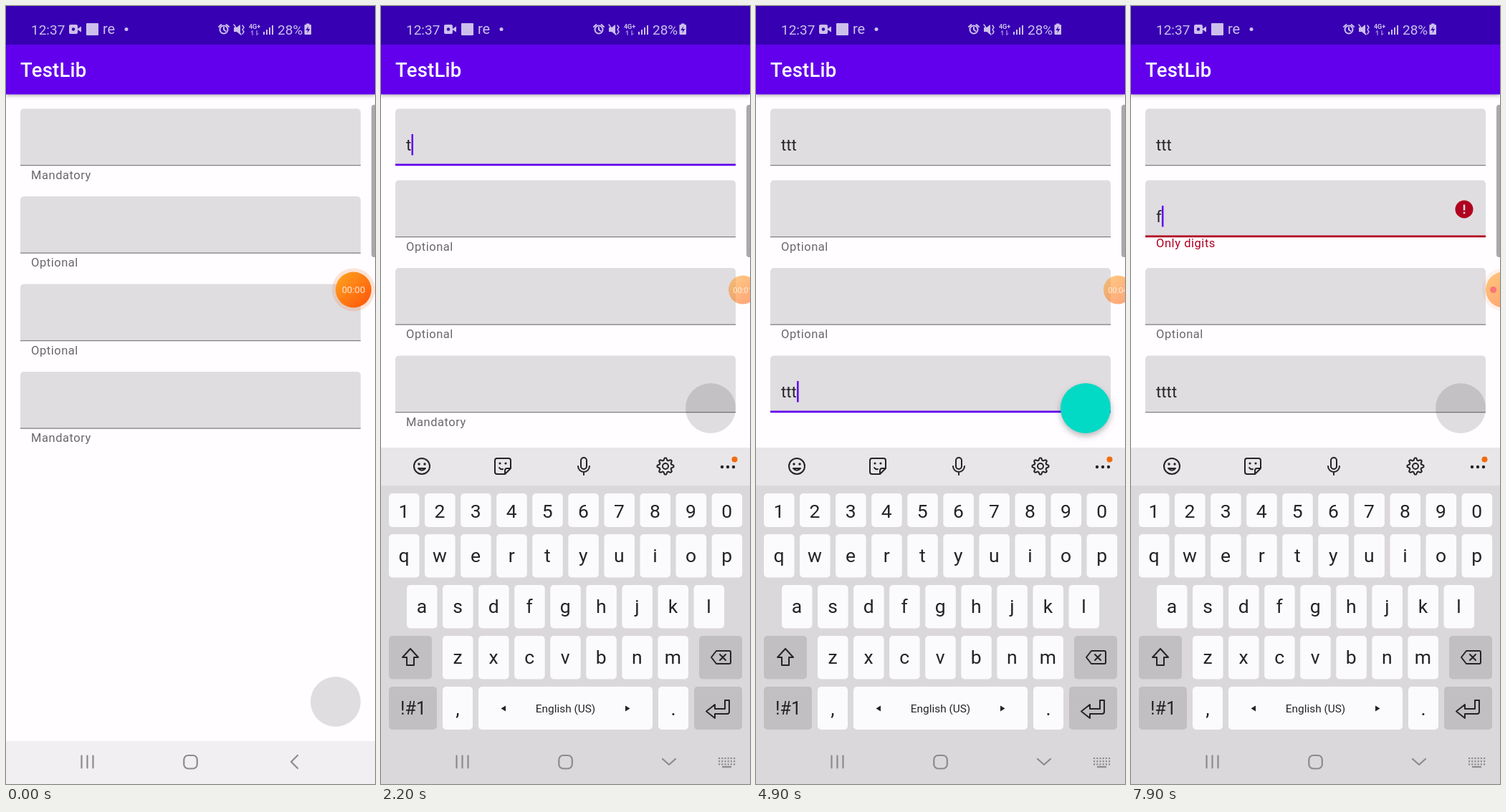
Write an HTML page with a canvas that moves like this. It is 515 by 1087 pixels and loops after 8 s.

```html
<!DOCTYPE html>
<html lang="en">
<head>
<meta charset="utf-8">
<title>Form validation</title>
<style>
html, body { margin: 0; width: 100%; height: 100%; overflow: hidden; background: #fffdff; }
canvas { display: block; }
</style>
</head>
<body>
<canvas id="stage" width="515" height="1087"></canvas>
<script>
const LOOP = 8000, STEP = 100;
const PURPLE = '#6200ee', RED = '#b00020', INK = '#242326', STATUS = '#cdbfec', NAV = '#8c8a8e';
const ctx = document.getElementById('stage').getContext('2d');

function box(x, y, w, h, r, color) {
  ctx.fillStyle = color;
  ctx.beginPath();
  ctx.roundRect(x, y, w, h, r);
  ctx.fill();
}

function disc(x, y, r, color) {
  ctx.fillStyle = color;
  ctx.beginPath();
  ctx.arc(x, y, r, 0, 7);
  ctx.fill();
}

function text(str, x, y, size, color, { align = 'left', weight = 400, spacing = 0 } = {}) {
  ctx.font = `${weight} ${size}px Roboto, sans-serif`;
  ctx.letterSpacing = spacing + 'px';
  ctx.textAlign = align;
  ctx.fillStyle = color;
  ctx.fillText(str, x, y);
}

function icon(d, x, y, color, width = 0) {
  const path = new Path2D(d);
  ctx.save();
  ctx.translate(x, y);
  ctx.lineCap = ctx.lineJoin = 'round';
  ctx.lineWidth = width;
  ctx.strokeStyle = ctx.fillStyle = color;
  width ? ctx.stroke(path) : ctx.fill(path);
  ctx.restore();
}

function withShadow(blur, dy, draw) {
  ctx.save();
  ctx.shadowColor = 'rgba(0,0,0,.28)';
  ctx.shadowBlur = blur;
  ctx.shadowOffsetY = dy;
  draw();
  ctx.restore();
}

const countPassed = (times, t) => times.filter(time => t >= time).length;
const ringPath = r => `M${r} 0A${r} ${r} 0 1 1 ${-r} 0A${r} ${r} 0 1 1 ${r} 0`;
const gearPath = 'M' + Array.from({ length: 64 }, (_, i) => {
  const a = i * Math.PI / 32, r = 10 + 1.5 * Math.tanh(3 * Math.cos(8 * a));
  return `${r * Math.cos(a)} ${r * Math.sin(a)}`;
}).join('L') + 'Z' + ringPath(4);

// Moments of each key press, release and caret toggle
const FIRST_TYPED = [2200, 2400, 2600], LAST_TYPED = [4500, 4700, 4900, 5100];
const CARET = [800, 1600, 2100, 3100, 3500, 4000, 4500, 5600, 6100, 7100, 7600];
const ERROR_AT = 7800;

function stateAt(t) {
  const first = 't'.repeat(countPassed(FIRST_TYPED, t));
  const last = 't'.repeat(countPassed(LAST_TYPED, t));
  const error = t >= ERROR_AT;
  const tPressed = [...FIRST_TYPED, ...LAST_TYPED].some(up => t >= up - 100 && t < up);
  return {
    values: [first, error ? 'f' : '', '', last],
    focus: t < 800 ? -1 : t < 3500 ? 0 : t < 6600 ? 3 : 1,
    caret: countPassed(CARET, t) % 2 === 1,
    pressed: tPressed ? 't' : t >= 7600 && t < ERROR_AT ? 'f' : '',
    keyboard: t >= 800,
    valid: first && last && !error,
    error
  };
}

function statusBar() {
  box(0, 0, 515, 54, 0, '#3700b3');
  text('12:37', 35, 40, 19, STATUS);
  box(88, 26, 12, 13, 2, STATUS);
  icon('M0 0L6 -4V4Z', 99, 32.5, STATUS);
  disc(94, 32.5, 2.2, '#3700b3');
  box(112, 24, 17, 17, 1, STATUS);
  text('re', 135, 38.5, 20, STATUS);
  disc(168, 32.5, 2.5, STATUS);

  icon(ringPath(5.5) + 'M0 -3V0L2.5 2M-7 -4L-3.5 -7M7 -4L3.5 -7', 304, 33, STATUS, 2);
  icon('M-7 -3H-3L2 -7V7L-3 3H-7Z', 325, 33, STATUS);
  icon('M-7 -7L3 7M5 -6L7 -3L5 0L7 3L5 6', 325, 33, STATUS, 1.5);
  text('4G+', 347, 32, 9, STATUS, { align: 'center', weight: 700 });
  icon('M-3 5V-1L-5 1M3 -1V5L5 3', 347, 35.5, STATUS, 1);
  for (let i = 0; i < 4; i++) box(359 + i * 4, 36 - i * 3, 2, 4 + i * 3, 0, STATUS);
  text('28%', 379, 40, 19, STATUS);
  box(416.5, 26, 9.5, 14, 1, STATUS);
  box(419, 24.5, 4.5, 3, 0, STATUS);
  icon('M1 -5L-3 1H0L-1 5L3 -1H0Z', 421.3, 33, '#3700b3');
}

function appBar() {
  withShadow(5, 2, () => box(0, 53.5, 515, 70, 0, PURPLE));
  text('TestLib', 20, 99, 27.5, '#fff', { weight: 500, spacing: .2 });
}

function form(t, state) {
  const helpers = ['Mandatory', 'Optional', 'Optional', 'Mandatory'];
  let top = 143.5;
  helpers.forEach((helper, i) => {
    const value = state.values[i], focused = state.focus === i, wrong = state.error && i === 1;
    box(20, top, 475, 79.5, [5, 5, 0, 0], '#dfdde0');
    if (focused) box(20, top + 77, 475, 2.7, 0, wrong ? RED : PURPLE);
    else box(20, top + 78.4, 475, 1.3, 0, '#807e82');

    text(value, 35, top + 58.5, 22, INK, { spacing: .1 });
    if (focused && state.caret) {
      const width = value ? ctx.measureText(value).width : 0;
      box(35.2 + width, top + 35.5, 2.5, 29.5, 0, PURPLE);
    }
    if (wrong) {
      const k = Math.min(1, (t - ERROR_AT + 100) / 200);
      ctx.globalAlpha = k;
      text('Only digits', 35, top + 93, 16.5, RED, { spacing: .55 });
      ctx.globalAlpha = 1;
      disc(465, top + 40.5, 12.5, RED);
      box(463.8, top + 34, 2.5, 8, 0, '#dfdde0');
      box(463.8, top + 44.2, 2.5, 2.5, 0, '#dfdde0');
    } else if (!value) {
      text(helper, 35, top + 98, 16.5, '#69676b', { spacing: .55 });
    }
    top += value && !wrong ? 100 : 122.5;
  });
}

function actionButton(state) {
  const y = state.keyboard ? 562 : 972;
  if (state.valid) withShadow(9, 4, () => disc(460, y, 35, '#03dac5'));
  else disc(460, y, 35, 'rgba(0,0,0,.125)');
}

function toolbar() {
  const y = 643;
  box(0, 617, 515, 53, 0, '#e8e6e9');
  icon(ringPath(11) + 'M-5 3Q0 8.5 5 3Z', 57, y, INK, 2);
  disc(53, y - 3, 1.7, INK);
  disc(61, y - 3, 1.7, INK);
  icon('M-8 -11H8Q11 -11 11 -8V3L3 11H-8Q-11 11 -11 8V-8Q-11 -11 -8 -11ZM11 3H6Q3 3 3 6V11M-5 2Q-3 5 0 4', 170, y, INK, 2);
  disc(166, y - 4, 1.6, INK);
  disc(174, y - 4, 1.6, INK);
  icon('M-4 -8A4 4 0 0 1 4 -8V0A4 4 0 0 1 -4 0ZM-8 0A8 8 0 0 0 8 0M0 8V12', 283, y, INK, 2);
  icon(gearPath, 397, y, INK, 2);
  for (const x of [476, 484, 492]) disc(x, y + 1, 2.2, INK);
  disc(493.5, 633.5, 4, '#f36b0c');
}

function keyboard(t, pressed) {
  const WHITE = '#fbfafc', GREY = '#c1bfc2';
  const rows = [
    ['1234567890', 32, 681, 47, 33.5], ['qwertyuiop', 32, 738, 60.5, 39],
    ['asdfghjkl', 57, 809, 60.5, 39], ['zxcvbnm', 107, 880, 60.5, 39]
  ];
  let popup;
  ctx.save();
  ctx.translate(0, 120 * Math.exp((800 - t) / 50));
  box(0, 617, 515, 470, 0, '#dad8db');
  toolbar();
  for (const [letters, x0, y, h, base] of rows) {
    [...letters].forEach((letter, i) => {
      const x = x0 + i * 50.07;
      if (letter === pressed) popup = { x, y };
      box(x - 21, y, 42.5, h, 5, letter === pressed ? '#afadb0' : WHITE);
      text(letter, x, y + base, 26.5, INK, { align: 'center' });
    });
  }
  box(11, 880, 60, 60.5, 5, GREY);
  box(444, 880, 60, 60.5, 5, GREY);
  icon('M0 -12L-11 0H-5V11H5V0H11Z', 41, 910, INK, 2);
  icon('M-13 0L-6 -9H12Q14 -9 14 -7V7Q14 9 12 9H-6ZM-1 -4L7 4M7 -4L-1 4', 474, 910, INK, 2);

  box(11, 951, 67, 60, 5, GREY);
  box(86, 951, 42, 60, 5, WHITE);
  box(136, 951, 243, 60, 5, WHITE);
  box(387, 951, 42, 60, 5, WHITE);
  box(437, 951, 67, 60, 5, GREY);
  text('!#1', 45, 990, 25, INK, { align: 'center' });
  text(',', 107, 991, 27, INK, { align: 'center' });
  text('.', 408, 991, 27, INK, { align: 'center' });
  text('English (US)', 257.5, 987, 15.4, INK, { align: 'center' });
  icon('M-3.5 0L3 -4V4Z', 171, 981.5, INK);
  icon('M3.5 0L-3 -4V4Z', 344, 981.5, INK);
  icon('M16 -12H10V0H-4V-6L-16 3.5L-4 13V7H13Q16 7 16 4Z', 470, 982, INK, 2);

  if (popup) {
    withShadow(6, 2, () => box(popup.x - 38, popup.y - 110, 76.5, 100, 9, WHITE));
    text(pressed, popup.x, popup.y - 43, 38, INK, { align: 'center' });
  }
  ctx.restore();
}

function navBar(open) {
  box(0, 1027, 515, 60, 0, open ? '#dad8db' : '#f1eff2');
  icon('M-8 -8.5V8.5M0 -8.5V8.5M8 -8.5V8.5', 113.5, 1056, NAV, 2.2);
  ctx.strokeStyle = NAV;
  ctx.lineWidth = 2.2;
  ctx.beginPath();
  ctx.roundRect(248.3, 1047, 18.5, 18.5, 6);
  ctx.stroke();
  if (!open) return icon('M5 -9L-4 0L5 9', 402, 1056, NAV, 2.2);
  icon('M-9 -4L0 4L9 -4', 402, 1056, NAV, 2.2);
  for (let row = 0; row < 3; row++)
    for (let col = 0; col < 6; col++) box(471 + col * 4.2, 1050 + row * 4.2, 2.2, 2.2, 0, NAV);
  box(476, 1062, 13, 2.2, 0, NAV);
}

function recorderBubble(t) {
  const parked = t >= 5600;
  const k = Math.min(1, Math.max(0, (t - 1500) / 500)) ** 1.4;
  const x = parked ? 520 : 485 + 20 * k, r = parked ? 25 : 25 - 5 * k, y = 396.5;
  const fill = ctx.createLinearGradient(x - r, y - r, x + r, y + r);
  fill.addColorStop(.15, '#ff9a1c');
  fill.addColorStop(.85, '#ff5e0c');
  ctx.globalAlpha = t < 1600 ? 1 : .55;
  disc(x, y, r * 1.2, `rgba(240,120,50,${.2 * (parked ? .8 : 1 - k)})`);
  disc(x, y, r, fill);
  ctx.globalAlpha = 1;
  if (parked) {
    disc(505.7, y, 4.6, t < 6100 ? 'rgba(248,118,118,.5)' : '#f87676');
  } else {
    const seconds = countPassed([1600, 2600, 3600, 4600], t);
    text(`00:0${seconds}`, x, 401, 13 - 2 * k, 'rgba(255,244,232,.9)', { align: 'center' });
  }
}

function draw(t) {
  const state = stateAt(t);
  box(0, 0, 515, 1087, 0, '#fffdff');
  form(t, state);
  appBar();
  statusBar();
  actionButton(state);
  if (state.keyboard) keyboard(t, state.pressed);
  navBar(state.keyboard);
  box(510, 138, 8, 213, 4, '#aaa8ab');
  recorderBubble(t);
}

const start = performance.now();
function tick() {
  const elapsed = (performance.now() - start) % LOOP;
  draw(Math.floor(elapsed / STEP) * STEP);
  requestAnimationFrame(tick);
}
tick();
</script>
</body>
</html>
```
